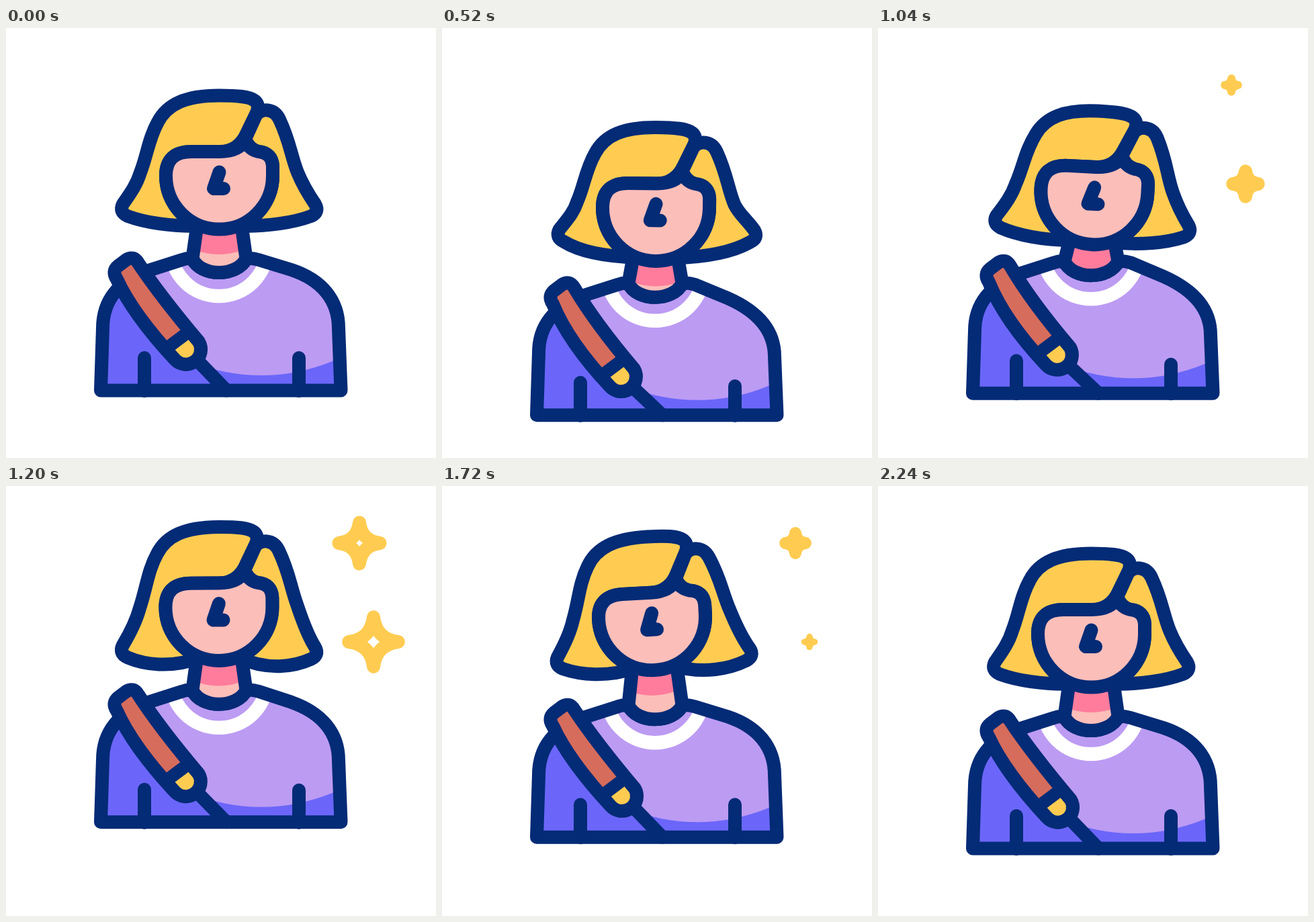
Recreate the animation shown at these times as an HTML page with a canvas. Size 640 px wide and 640 px high, loop 2400 ms.

```html
<!DOCTYPE html>
<html lang="en">
<head>
<meta charset="utf-8">
<title>Bouncing avatar</title>
<style>
html, body { margin: 0; width: 100%; height: 100%; overflow: hidden; background: #fff; }
canvas { display: block; width: 100vw; height: 100vh; }
</style>
</head>
<body>
<canvas id="stage"></canvas>
<script>
const LOOP = 2400, STEP = 40, SIZE = 640;
const NAVY = '#042b76', HAIR = '#ffcc51', SKIN = '#fcbeb9', SHADE = '#ff7c9c',
  TOP = '#bc9bf3', BLUE = '#6b66f9', STRAP = '#d66c5c', WHITE = '#fff';

const canvas = document.getElementById('stage');
const ctx = canvas.getContext('2d');

const smooth = p => p * p * (3 - 2 * p);
// Smooth curve that settles a little early.
const settle = p => smooth(p + 0.7 * p * p * (1 - p));

// Eases between [time, value] key poses.
function track(ease, ...keys) {
  return t => {
    const i = keys.findIndex(k => k[0] > t);
    if (i === 0) return keys[0][1];
    if (i < 0) return keys[keys.length - 1][1];
    const [t0, v0] = keys[i - 1], [t1, v1] = keys[i];
    return v0 + (v1 - v0) * ease((t - t0) / (t1 - t0));
  };
}

const bodyY = track(settle, [200, 0], [780, 51.5], [800, 51.5], [1400, -53.3], [2000, 0]);
const headY = track(settle, [230, 0], [820, 77], [1430, -66], [2020, 0]);
const tilt = track(smooth, [380, 0], [920, 3.8], [1500, -5], [2040, 0]);
const swing = track(smooth, [200, 0], [760, -13], [1400, 22], [2000, 0]);
const squash = track(smooth, [200, 0], [820, 10], [1300, 0]);
const starA = track(smooth, [880, 0], [1460, 53], [1860, 0]);
const starB = track(smooth, [820, 0], [1280, 40], [1360, 40], [1860, 0]);

function shape(d, fill, line, width = 20) {
  const p = new Path2D(d);
  if (fill) { ctx.fillStyle = fill; ctx.fill(p); }
  if (line) { ctx.strokeStyle = line; ctx.lineWidth = width; ctx.stroke(p); }
}

function clipped(d, draw) {
  ctx.save();
  ctx.clip(new Path2D(d));
  draw();
  ctx.restore();
}

function drawBody(y, q) {
  const drop = 0.7 * q;
  const body = `M141 539.5L144 447C144 405 168 ${376 + q * 0.3} 212 361L262 345Q270 342 277 343
    C290 371 344 371 358 343Q366 342 376 345L425 ${360 + q}
    C470 ${375 + q * 1.9} 495 ${405 + q * 1.7} 495 ${447 + q}L498.5 539.5Z`;
  ctx.save();
  ctx.translate(0, y);
  clipped(body, () => {
    shape('M0 0H640V640H0Z', BLUE);
    clipped(`M180 300V357Q202 416 268 ${480 + drop}L328 539H640V300Z`, () => {
      shape('M104 241a276 276 0 1 0 552 0a276 276 0 1 0 -552 0', TOP);
    });
    shape('M245 327A72 72 0 0 0 389 327', null, WHITE, 20.5);
  });
  shape(body, null, NAVY);
  shape(`M206 491V540M436 ${491 + q}V540M288 ${498 + drop}L328 539.5`, null, NAVY);
  drawStrap(drop);
  ctx.restore();
}

function drawStrap(d) {
  const x = -0.3 * d;
  const band = `M${251 + x} ${493 + d}Q${189 + x} ${426 + d * 1.2} 165 374Q157 362 167 354L179 345
    Q190 338 197 350Q${229 + x} ${398 + d * 1.2} ${287 + x} ${467 + d}
    A22.3 22.3 0 0 1 ${251 + x} ${493 + d}Z`;
  shape(band, STRAP);
  clipped(band, () => {
    shape(`M${235 + x} ${480 + d}L${273 + x} ${450 + d}L320 ${480 + d}L270 ${530 + d}Z`, HAIR);
    shape(`M${232 + x} ${482 + d}L${280 + x} ${446 + d}`, null, NAVY, 19);
  });
  shape(band, null, NAVY);
}

function placeHead(y, angle) {
  ctx.translate(317, 310 + y);
  ctx.rotate(angle);
  ctx.translate(-317, -310);
}

function drawNeck(by, hy, angle) {
  const top = 290 + hy, base = 343 + by, lean = Math.sin(angle) * 20;
  const neck = `M${285 + lean} ${top}L277.5 ${base}C290 ${base + 28} 344 ${base + 28} 357.5 ${base}
    L${350 + lean} ${top}Z`;
  shape(neck, SKIN);
  clipped(neck, () => {
    placeHead(hy, angle);
    shape('M217 237a100 100 0 1 0 200 0a100 100 0 1 0 -200 0', SHADE);
  });
  shape(neck, null, NAVY);
}

// The lower edge of the hair bulges more when swinging down than up.
const bulge = s => s > 0 ? s * 1.1 : s * 0.3;

function drawHead(y, angle, s) {
  const r = s * 1.3, out = Math.max(0, -r) * 0.4;
  const bl = bulge(s), br = bulge(r);
  ctx.save();
  placeHead(y, angle);
  shape(`M317 100.5C345 100.5 362 102 370 108Q378 114 373 126L358 157Q346 184 318 184H276
    Q238 184 238 220A79.5 79.5 0 0 0 290 294.5
    C245 ${296 + bl} 205 ${289 + bl} 181 ${280 + s}Q168 ${274 + s} 174 ${262 + s}
    C186 ${245 + s * 0.8} 195 ${232 + s * 0.4} 200 ${215 + s * 0.3}
    C210 190 212 165 226 140C240 113 268 100.5 317 100.5Z`, HAIR, NAVY);
  shape(`M372 130C380 119 399 119 407 136C423 170 424 190 434 ${215 + r * 0.15}
    C441 ${232 + r * 0.4} ${449 + out} ${246 + r * 0.9} ${460 + out} ${262 + r}
    Q${467 + out} ${274 + r} ${454 + out} ${280 + r}
    C430 ${289 + br} 390 ${296 + br} 345 294.5A79.5 79.5 0 0 0 397 220V206
    Q396 186 376 184Q362 181 356 165Z`, HAIR, NAVY);
  shape(`M238 220A79.5 79.5 0 0 0 397 220V206Q396 186 376 184Q362 181 356 167
    Q346 184 318 184H276Q238 184 238 220Z`, SKIN, NAVY);
  shape('M317.5 214.5L309 239H324', NAVY, NAVY);
  ctx.restore();
}

function drawStar(x, y, r) {
  if (r < 0.5) return;
  const k = r * 0.11;
  ctx.save();
  ctx.translate(x, y);
  shape(`M0 ${-r}Q${k} ${-k} ${r} 0Q${k} ${k} 0 ${r}Q${-k} ${k} ${-r} 0Q${-k} ${-k} 0 ${-r}Z`,
    null, HAIR, Math.min(20, r * 1.2));
  ctx.restore();
}

function frame(now) {
  const t = Math.floor(now % LOOP / STEP) * STEP;
  const dpr = window.devicePixelRatio || 1;
  const w = Math.round(innerWidth * dpr), h = Math.round(innerHeight * dpr);
  if (canvas.width !== w || canvas.height !== h) {
    canvas.width = w;
    canvas.height = h;
  }
  ctx.setTransform(w / SIZE, 0, 0, h / SIZE, 0, 0);
  ctx.fillStyle = WHITE;
  ctx.fillRect(0, 0, SIZE, SIZE);
  ctx.lineCap = ctx.lineJoin = 'round';

  const by = bodyY(t), hy = headY(t), angle = tilt(t) * Math.PI / 180;
  drawBody(by, squash(t));
  drawNeck(by, hy, angle);
  drawHead(hy, angle, swing(t));
  drawStar(526, 85, starA(t));
  drawStar(547, 232, starB(t));
}

const start = performance.now();
function loop() {
  frame(performance.now() - start);
  requestAnimationFrame(loop);
}
loop();
</script>
</body>
</html>
```
